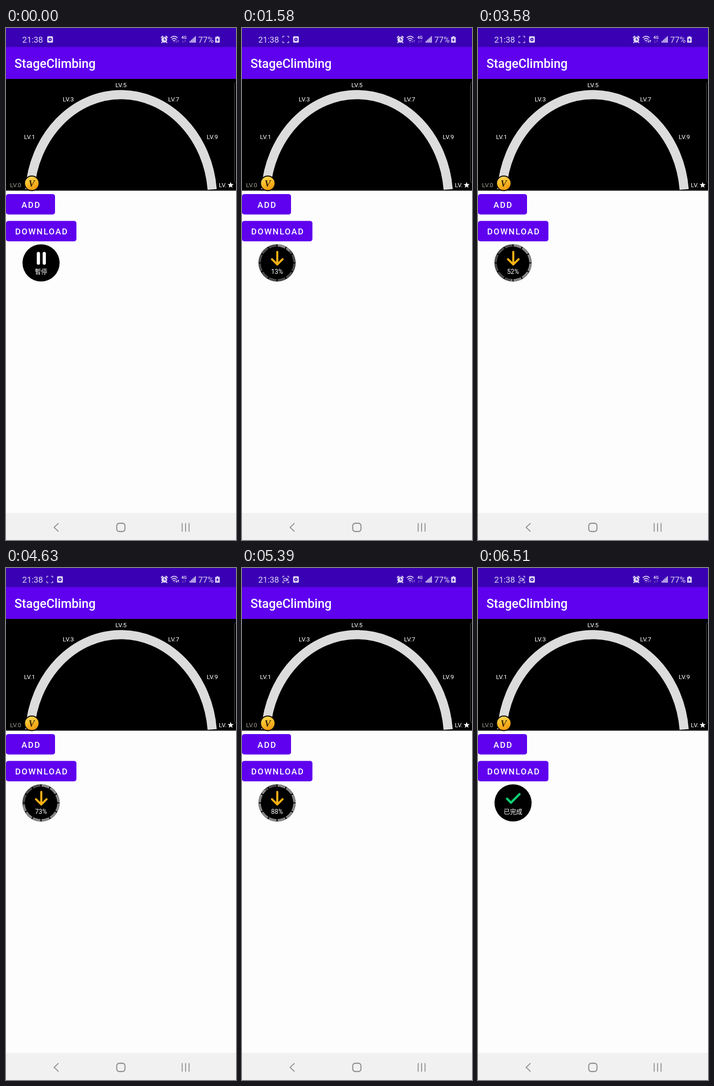
An HTML page for the animation above (6.81 s loop, 502x1116 px).

```html
<!DOCTYPE html>
<html lang="zh-Hant">
<head>
<meta charset="utf-8">
<title>StageClimbing</title>
<style>
  html, body { margin: 0; width: 100%; height: 100%; overflow: hidden; background: #fdfdfd; }
  svg { display: block; width: 502px; height: 1116px; }
  text { font-family: Roboto, "Noto Sans CJK TC", "Noto Sans CJK", sans-serif; fill: #fff; }
  .mid { text-anchor: middle; }
  .level { font-size: 13.6px; }
  .title { font-size: 27px; font-weight: 500; }
  .button text { font-size: 18.4px; font-weight: 500; letter-spacing: 2px; }
  .button rect { fill: #5f00ee; }
  .status { fill: #e0d6f6; }
  .status text { fill: #e0d6f6; }
  .line { fill: none; stroke-linecap: round; stroke-linejoin: round; }
  .caption { font-size: 13.6px; }
  .ring { fill: none; stroke-width: 5; stroke-dasharray: 26 4; stroke-dashoffset: -2; }
</style>
</head>
<body>
<svg viewBox="0 0 502 1116">
  <defs>
    <linearGradient id="gold" x1="0" y1="0" x2="0.4" y2="1">
      <stop offset="0" stop-color="#ffdf62"/>
      <stop offset="0.5" stop-color="#fbc02c"/>
      <stop offset="1" stop-color="#ee9d12"/>
    </linearGradient>
    <mask id="reached" maskUnits="userSpaceOnUse" x="-45" y="-45" width="90" height="90">
      <circle id="sweep" r="38" pathLength="360" fill="none" stroke="#fff" stroke-width="8"/>
    </mask>
  </defs>

  <rect width="502" height="1116" fill="#fdfdfd"/>
  <rect width="502" height="43" fill="#3a00b4"/>
  <rect y="41.500" width="502" height="70" fill="#5f00ee"/>
  <text class="title" x="18.500" y="87">StageClimbing</text>

  <!-- status bar -->
  <g class="status">
    <text x="35.500" y="31.700" font-size="18.200">21:38</text>
    <g id="recorder" class="line" stroke="#d3c6f2" stroke-width="1.400">
      <path d="M89 21V18H92M99 18H102V21M102 29V32H99M92 32H89V29"/>
      <path id="camera" d="M91.500 22.500H97V28H91.500ZM97 25L100 23V27.500Z"/>
    </g>
    <g id="notice">
      <rect x="90" y="18" width="12.500" height="14" rx="2"/>
      <circle cx="96.200" cy="25" r="3.500" fill="#3a00b4"/>
      <circle cx="96.200" cy="25" r="1.400"/>
    </g>
    <circle cx="345.500" cy="25.500" r="6.300"/>
    <path class="line" stroke="#e0d6f6" stroke-width="2.400" d="M339 20.500L342 18M352 20.500L349 18M341 31L340 32M350 31L351 32"/>
    <path class="line" stroke="#3a00b4" stroke-width="1.400" d="M345.500 22V26H348.500"/>
    <g class="line" stroke="#e0d6f6" stroke-width="1.700">
      <path d="M360 21Q367 15 374 21M362.500 24.500Q367 20.500 371.500 24.500M364.800 27.700Q367 26 369 27.700"/>
      <path d="M367 30.500V30.600"/>
    </g>
    <path id="traffic" class="line" stroke="#e0d6f6" stroke-width="1.300" d="M372 26.500V31M370.700 29.700L372 31L373.300 29.700M376 31V26.500M374.700 27.800L376 26.500L377.300 27.800"/>
    <text class="mid" x="388.500" y="24" font-size="9" font-weight="700">4G</text>
    <path class="line" stroke="#e0d6f6" opacity=".4" d="M386 27V31.500M384.700 30.200L386 31.500L387.300 30.200M391 31.500V27M389.700 28.300L391 27L392.300 28.300"/>
    <path d="M401 28h2v4h-2zM404 25.500h2v6.500h-2zM406.800 23h2v9h-2zM409.600 20.500h2v11.500h-2zM412.300 18h2v14h-2z"/>
    <text x="419.500" y="31.700" font-size="18.200">77%</text>
    <path d="M459.500 18H463.500V19.500H466.500V32H456.500V19.500H459.500Z"/>
    <path d="M462.500 21L458.500 26.500H461L460 30.500L464.500 25H462Z" fill="#3a00b4"/>
  </g>

  <!-- level gauge -->
  <rect y="111" width="502" height="243.500" fill="#000"/>
  <rect x="498.500" y="118.500" width="20" height="219" rx="5" fill="none" stroke="#5b5660"/>
  <path d="M52 352A199.800 227 0 0 1 450 352" fill="none" stroke="#dcdcdc" stroke-width="20"/>
  <g class="level mid">
    <text x="21" y="347" style="fill:#a29d94">LV.0</text>
    <text x="51.500" y="242">LV.1</text>
    <text x="136" y="160">LV.3</text>
    <text x="251" y="129">LV.5</text>
    <text x="366" y="160">LV.7</text>
    <text x="450.300" y="242">LV.9</text>
  </g>
  <text class="level" x="464.500" y="347">LV.</text>
  <path id="star" fill="#fff"/>
  <circle cx="56.300" cy="338.500" r="17" fill="#100b04"/>
  <circle cx="56.300" cy="338.500" r="14.700" fill="url(#gold)"/>
  <text class="mid" x="56" y="345.500" font-size="20" font-weight="700" font-style="italic" style="font-family:'Liberation Serif',serif;fill:#35240a">V</text>

  <g class="button mid">
    <rect y="362" width="107" height="44.500" rx="5"/>
    <text x="55" y="391.500">ADD</text>
    <rect y="420.500" width="153.700" height="44.500" rx="5"/>
    <text x="78" y="450">DOWNLOAD</text>
  </g>

  <!-- download badge -->
  <g transform="translate(76.500 512)">
    <circle r="40.500"/>
    <g id="paused">
      <path class="line" stroke="#fff" stroke-width="7" d="M-5.800 -20.500V.500M7 -20.500V.500"/>
      <text class="caption mid" y="23.500">暫停</text>
    </g>
    <g id="loading">
      <g transform="rotate(-90)">
        <circle class="ring" r="38" pathLength="360" stroke="#4c4c4c"/>
        <g mask="url(#reached)"><circle class="ring" r="38" pathLength="360" stroke="#868686"/></g>
      </g>
      <path class="line" stroke="#f9b115" stroke-width="4.500" d="M.500 -24V3.500M-11 -8L.500 3.500L12 -8"/>
      <text id="percent" class="mid" y="23.500" font-size="14"></text>
    </g>
    <g id="done">
      <path class="line" stroke="#0fce73" stroke-width="5" d="M-13 -9L-4.500 -.500L14 -19"/>
      <text class="caption mid" y="23.500">已完成</text>
    </g>
  </g>

  <!-- navigation bar -->
  <rect y="1057" width="502" height="59" fill="#f1f1f1"/>
  <g class="line" stroke="#8f8f8f" stroke-width="2">
    <path d="M114 1080L105 1088.500L114 1097"/>
    <rect x="241.700" y="1079.500" width="18" height="18" rx="5.500" stroke-width="2.300"/>
    <path d="M384.500 1080V1097M392 1080V1097M399.500 1080V1097"/>
  </g>
</svg>
<script>
  const LOOP = 6810, START = 820, FIRST = 900, STEP = 50.8;
  const END = FIRST + 100 * STEP;
  const RECORD_AT = 400;
  const $ = id => document.getElementById(id);
  const show = (id, on) => $(id).setAttribute("visibility", on ? "inherit" : "hidden");

  const corners = Array.from({ length: 10 }, (_, i) => {
    const r = i % 2 ? 2.9 : 7, a = (i * 36 - 90) * Math.PI / 180;
    return `${490.3 + r * Math.cos(a)} ${342.5 + r * Math.sin(a)}`;
  });
  $("star").setAttribute("d", `M${corners.join("L")}Z`);

  function draw(t) {
    const recording = t >= RECORD_AT;
    show("recorder", recording);
    show("camera", recording && (t + 260) % 1060 < 530);
    $("notice").setAttribute("transform", `translate(${recording ? 21.5 : 0})`);
    $("traffic").setAttribute("opacity", t >= 2870 && t < 4980 ? 1 : 0.4);

    show("paused", t < START);
    show("loading", t >= START && t < END);
    show("done", t >= END);
    const p = Math.min(100, Math.max(t < 880 ? 0 : 1, Math.floor((t - FIRST) / STEP)));
    $("percent").textContent = p + "%";
    $("sweep").setAttribute("stroke-dasharray", `${p * 3.6} 400`);
  }

  const origin = performance.now();
  function tick() {
    draw((performance.now() - origin) % LOOP);
    requestAnimationFrame(tick);
  }
  tick();
</script>
</body>
</html>
```
